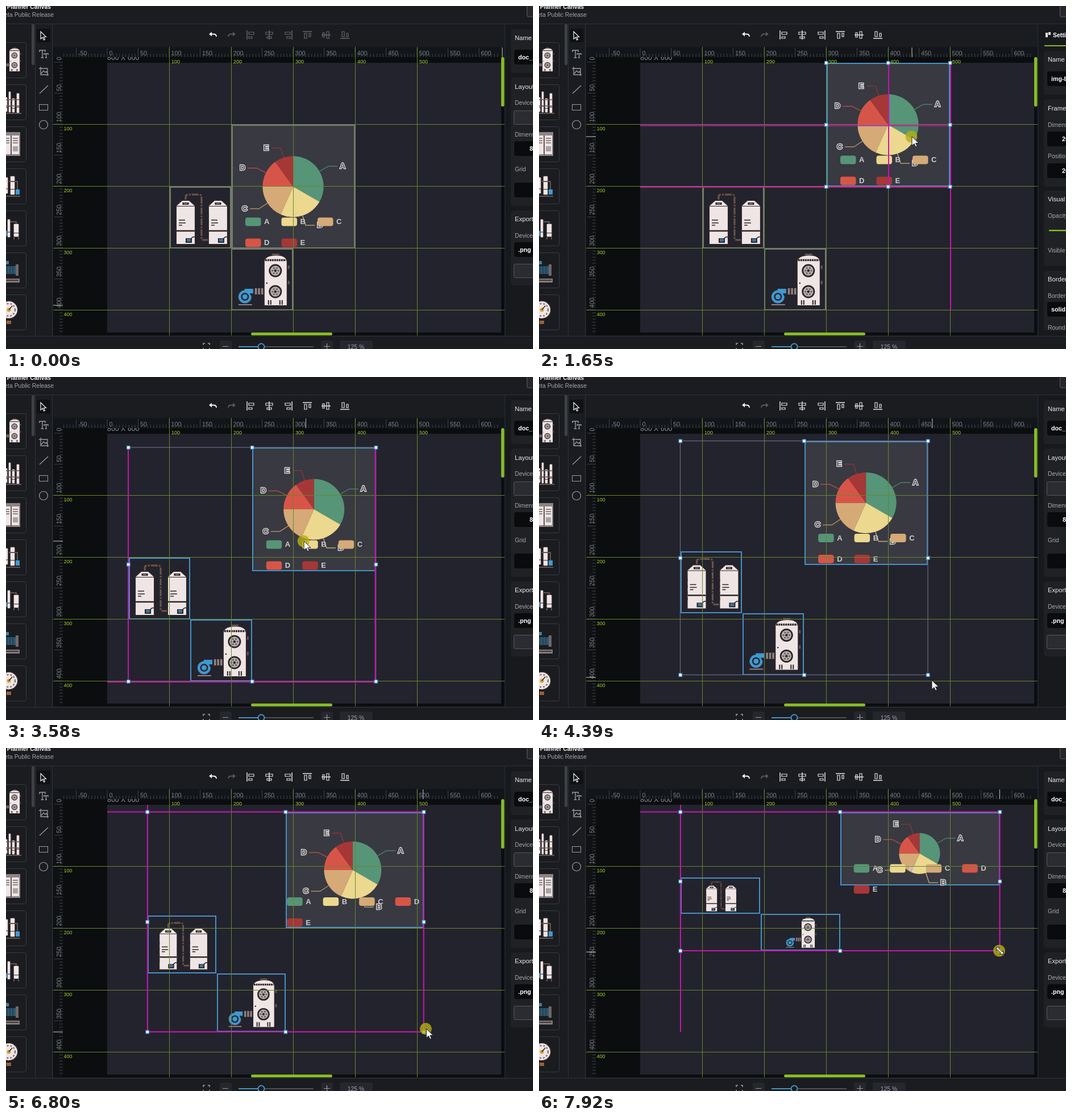
An HTML page for the animation above (7990 ms loop, 927 by 604 pixels).

```html
<!DOCTYPE html>
<html lang="en">
<head>
<meta charset="utf-8">
<title>Canvas editor</title>
<style>
html, body { margin: 0; width: 100%; height: 100%; overflow: hidden; background: #17191d; }
svg { display: block; width: 927px; height: 604px; font-family: "Liberation Sans", Arial, sans-serif; }
</style>
</head>
<body>
<svg id="stage" viewBox="0 0 927 604"></svg>
<script>
const LOOP = 7990;
const BLUE = '#4592c6', LIME = '#86bc22', PINK = '#c913b0', CREAM = '#efe5e4', DARK = '#2c2327', BROWN = '#65564f';
const UNIT = 1.09, X0 = 178, Y0 = 99;

// Markup helpers
const rect = (x, y, w, h, fill, more = '') => `<rect x="${x}" y="${y}" width="${w}" height="${h}" fill="${fill}" ${more}/>`;
const line = (x1, y1, x2, y2, color, width = 1) => `<path d="M${x1} ${y1}L${x2} ${y2}" stroke="${color}" stroke-width="${width}"/>`;
const path = (d, color, width = 1.5, fill = 'none', more = '') => `<path d="${d}" stroke="${color}" stroke-width="${width}" fill="${fill}" ${more}/>`;
const shape = (d, fill) => `<path d="${d}" fill="${fill}"/>`;
const circle = (x, y, r, fill, more = '') => `<circle cx="${x}" cy="${y}" r="${r}" fill="${fill}" ${more}/>`;
const text = (x, y, s, size, fill, more = '') => `<text x="${x}" y="${y}" font-size="${size}" fill="${fill}" ${more}>${s}</text>`;
const group = (transform, body) => `<g transform="${transform}">${body}</g>`;
const range = (n, f) => Array.from({ length: n }, (_, i) => f(i)).join('');

// Icons drawn on a 109 x 109 square
function fan(x, y) {
  return circle(x, y, 11.5, DARK) + circle(x, y, 8.8, '#b5aeae') +
    range(6, i => {
      const a = i * Math.PI / 3;
      return circle(x + 5.2 * Math.cos(a), y + 5.2 * Math.sin(a), 1.6, '#625b5d');
    }) + circle(x, y, 2.2, DARK);
}
const boiler = path('M59 22Q61 13 78.5 12.500T98 22V100H59Z', DARK, 4, CREAM) +
  shape('M59 22Q61 13 78.5 12.500T98 22V100H59Z', CREAM) +
  rect(72, 9, 13, 3, BROWN) + path('M60 20.500H97', DARK, 3.5, 'none', 'stroke-dasharray="3 1"') +
  fan(78, 39) + fan(78, 76) + rect(100, 30, 3, 6, BROWN) + rect(100, 57, 3, 6, BROWN) +
  circle(63, 61, 1.3, DARK) + path('M66 91V99M70 91V99M86 91V99M90 91V99', DARK, 2) +
  rect(41, 69, 17, 13, DARK) + range(3, i => rect(42 + i * 5.5, 70, 3.5, 11, '#8d8385')) +
  circle(24.5, 85, 14, DARK) + rect(24, 69, 16, 13, DARK) +
  shape('M24 71H39V79H33L36 85A11.500 11.500 0 1 1 24 73.500Z', '#3d9ad2') +
  circle(24.5, 85, 7, DARK) + circle(24.5, 85, 4.5, '#3d9ad2') +
  path('M13 99H37', '#8d8385', 2);

const body = 'M0 67V0L10 -9H22L32 0V67Z';
const vessel = group('translate(13 34)', path(body, DARK, 4, DARK) + shape(body, CREAM) +
  path('M0 .5H32', DARK, 1) + rect(10.5, -6, 11, 4, DARK) + rect(13, -5, 6, 2, '#777') + path('M0 44H32', DARK, 2.5) +
  path('M4 25H15M4 30H16M4 34H10', DARK, 1.6) + rect(16, 57, 11, 8, DARK) + rect(18, 58, 7, 5, '#3579a3') +
  range(4, i => rect(-4, 15 + i * 11, 4, 5, DARK)) + path('M25 59Q28 53 33 55', DARK, 1.5));
const pipeLine = 'M29 24V18Q29 14 34 14H52Q57 14 57 19V91Q57 94 61 94H70';
const pipe = path(pipeLine, DARK, 5.5) + path(pipeLine, BROWN, 3, 'none', 'stroke-dasharray="12 2 3 2"');
const tanks = pipe + vessel + group('translate(57 0)', vessel);

// Static interface
const dimText = (x, y, s) => text(x, y, s, 10.4, '#a6a8ac');
const lightText = (x, y, s) => text(x, y, s, 11.2, '#e8e8ea');
const card = (y, h) => rect(888, y, 60, h, '#1f2125', 'rx="5"');
const field = (y, s = '', x = 901) => rect(894, y, 50, 26, '#0a0b0d', 'rx="4"') + text(x, y + 17, s, 10.7, '#fff', 'font-weight="bold"');
const button = y => rect(893.5, y + .5, 50, 24, '#2a2c31', 'rx="2" stroke="#55575c"');

const docPanel = card(41, 77) + lightText(895, 60, 'Name') + field(77, 'doc_1') +
  card(126, 226) + lightText(895, 146, 'Layout') + dimText(895, 174, 'Device') + button(184) +
  dimText(895, 230, 'Dimensions') + field(238, '800', 921) + dimText(895, 291, 'Grid') + field(311) +
  card(360, 132) + lightText(895, 379, 'Export') + dimText(895, 408, 'Device') + field(416, '.png') + button(454);

const itemPanel = rect(891, 47, 4, 8, '#eee') + rect(896, 46, 4, 5, '#eee') + text(904, 55, 'Settings', 10.5, '#fff', 'font-weight="bold"') +
  rect(889, 69, 40, 2, LIME) +
  card(79, 77) + lightText(895, 98, 'Name') + field(115, 'img-box') +
  card(164, 154) + lightText(895, 184, 'Frame') + dimText(895, 213, 'Dimensions') + field(221, '200', 920) +
  dimText(895, 268, 'Position') + field(277, '200', 920) +
  card(325, 133) + lightText(895, 344, 'Visual') + dimText(895, 373, 'Opacity') + rect(897, 394, 40, 2.5, LIME) + dimText(895, 434, 'Visible') +
  card(466, 106) + lightText(895, 485, 'Border') + dimText(895, 514, 'Border') + field(521, 'solid') + dimText(895, 570, 'Round');

const silo = (x, y, w, h) => rect(x, y, w, h, CREAM, `rx="2" stroke="${DARK}" stroke-width="1.5"`) + line(x, y + h * .7, x + w, y + h * .7, DARK);
const thumbs = [
  group('translate(-21 69) scale(.46)', boiler),
  silo(-3, 160, 6, 27) + silo(4, 150, 5, 38) + silo(10, 162, 6, 26) + silo(18, 153, 6, 36) + path('M0 165H24M0 176H24', BROWN, 1.5) + rect(0, 188, 27, 2, BROWN),
  rect(-8, 222, 33, 42, '#8d8385') + rect(-6, 228, 29, 33, CREAM) + path('M9 228V262', DARK, 1.5) + path('M-2 233H6M12 233H21M-2 237H6M12 237H21M-2 241H6M12 241H21', DARK, 1.2) + rect(12, 247, 9, 9, '#aaa4a4'),
  silo(-4, 301, 8, 30) + silo(7, 299, 9, 34) + path('M5 309H20V330', BROWN, 2) + rect(17, 323, 7, 9, '#3d9ad2') + rect(-3, 334, 28, 2, BROWN),
  silo(2, 375, 6, 33) + silo(13, 383, 10, 24) + path('M8 380H18V383M14 407V411M22 407V411', BROWN, 2) + rect(-3, 396, 5, 9, '#3d9ad2'),
  rect(-4, 458, 21, 14, '#2d566f') + path('M2 458V472M7 458V472M12 458V472', '#22404f') + rect(17, 455, 5, 20, '#716769') + rect(-4, 449, 9, 6, '#40809f') + rect(-4, 480, 28, 7, '#857a7b') + path('M-2 483H22', DARK),
  circle(5, 535, 16, CREAM, `stroke="${DARK}" stroke-width="2"`) + circle(5, 535, 11, 'none', 'stroke="#83797a" stroke-width="2.500" stroke-dasharray="3 3"') + circle(5, 535, 3.5, '#d9a23c') + path('M5 535L11 528', DARK, 1.5) + rect(1, 554, 8, 6, '#96603a')
];

const GRAY = '#9a9ca1';
const tools = rect(54, 40, 24, 24, '#101114', 'rx="3"') +
  path('M61 45V58L64.3 55.2L66.5 60L68.5 59L66.3 54.5H70.5Z', '#f0f0f0', 1.2) +
  path('M59 81V78H69V81M64 78V91M61.500 91H66.500M67 86V84H74V86M70.500 84V91M69 91H72', GRAY, 1.4) +
  path('M58 110H73V123M61 107V121H75M62 119L66 114L69 117L71 115L73 119', GRAY, 1.3) + path('M59 154L74 140', GRAY, 1.3) +
  rect(58.5, 173.5, 15, 10, 'none', `stroke="${GRAY}"`) + circle(66, 209, 7.5, 'none', `stroke="${GRAY}" stroke-width="1.2"`);

const alignLeft = path('M-6 -8V8', 'currentColor') + path('M-3 -5H6V-1H-3ZM-3 3H3V6H-3Z', 'currentColor', 1.2);
const alignMid = path('M0 -8V8', 'currentColor') + path('M-6 -5H6V-1H-6ZM-4 3H4V6H-4Z', 'currentColor', 1.2);
const aligns = [[430, alignLeft, ''], [463, alignMid, ''], [497, alignLeft, 'scale(-1 1)'],
  [530, alignLeft, 'matrix(0 1 1 0 0 0)'], [563, alignMid, 'rotate(90)'], [596, alignLeft, 'matrix(0 -1 1 0 0 0)']]
  .map(([x, icon, tf]) => group(`translate(${x} 51) ${tf}`, icon)).join('');
const arrowBack = color => path('M-4 -1.500H1Q6 -1.500 6 3', color, 1.8) + shape('M-7 -1.500L-2 -5.500V2.500Z', color);

function rulers() {
  let out = rect(83, 72, 794, 18, '#121519') + rect(83, 90, 17, 490, '#0f1114');
  for (let u = -70; u <= 630; u += 5) {
    const x = X0 + u * UNIT, y = Y0 + u * UNIT, major = u % 50 === 0;
    if (x > 101 && x < 872) {
      out += line(x, major ? 74 : 84, x, 90, '#4b4e53', .8);
      if (major) out += text(x + 3.5, 86.5, u, 10.8, '#7b7e84');
    }
    if (y > 91 && y < 578) {
      out += line(major ? 85 : 94, y, 100, y, '#4b4e53', .8);
      if (major) out += group(`translate(97 ${y - 3.5}) rotate(-90)`, text(0, 0, u, 10.8, '#7b7e84'));
    }
  }
  return out;
}

const guides = range(5, i => line(287.5 + i * 109, 72, 287.5 + i * 109, 580, '#66872b') + text(291 + i * 109, 101, (i + 1) * 100, 9, '#a2d32e')) +
  range(4, i => line(83, 208.5 + i * 109, 877, 208.5 + i * 109, '#66872b') + text(101.5, 219 + i * 109, (i + 1) * 100, 9, '#a2d32e'));

document.getElementById('stage').innerHTML = `
<defs><clipPath id="view"><rect x="83" y="90" width="794" height="490"/></clipPath></defs>
${rect(0, 0, 927, 604, '#1a1c20')}${rect(0, 31, 927, 1, '#2c323b')}
${text(79, 5, 'n Planner Canvas', 10.3, '#f5f5f5', 'font-weight="bold" text-anchor="end"')}
${text(84, 19, 'eta Public Release', 10.4, '#a3a5aa', 'text-anchor="end"')}
${rect(916.5, -10, 30, 29, '#25272b', 'stroke="#5a5c61" rx="2"')}
${thumbs.map((t, i) => rect(-20.5, 64.5 + i * 74, 56, 62, '#1a1c20', 'rx="3" stroke="#393b40"') + t).join('')}
${rect(45, 32, 5, 72, '#3e4144', 'rx="2"')}${rect(51, 32, 1, 550, '#2c323b')}${rect(81, 32, 1, 550, '#2c323b')}${tools}
${group('translate(364 51)', arrowBack('#f4f4f4'))}${group('translate(397 51) scale(-1 1)', arrowBack('#55585d'))}
<g id="aligns">${aligns}</g>
${rect(83, 72, 794, 508, '#0b0d0f')}${rect(178, 100, 693, 475, '#23232d')}
<g clip-path="url(#view)">${text(178, 94.5, '800 X 600', 12.4, '#8b8d92')}</g>
${rulers()}
<g id="items" clip-path="url(#view)"></g>
${guides}
${rect(871, 90, 5.5, 87, LIME, 'rx="2.5"')}${rect(431, 575, 143, 5, LIME, 'rx="2.5"')}
${rect(877, 32, 1.5, 550, '#222d3b')}${rect(878.5, 32, 49, 549, '#17191d')}
<g id="docPanel">${docPanel}</g><g id="itemPanel">${itemPanel}</g>
${rect(0, 581, 927, 23, '#1a1c20')}${rect(0, 581, 927, 1, '#2c323b')}
${path('M347 597V594H350M355 594H358V597M358 602V605M347 602V605', GRAY)}
${rect(376, 589, 21, 20, '#25272c', 'rx="3"')}${rect(554, 589, 21, 20, '#25272c', 'rx="3"')}
${path('M381 599.5H391M559 599.5H570M564.5 594V605', GRAY, 1.2)}
${line(409, 600, 541, 600, '#606368', 1.5)}${line(409, 600, 449, 600, BLUE, 2)}${circle(449, 600, 5.5, '#1a1c20', `stroke="${BLUE}" stroke-width="2"`)}
${rect(587, 589, 58, 20, '#25262e', 'rx="3"')}${text(615.5, 603.5, '125 %', 10.4, '#a3a5aa', 'text-anchor="middle"')}
<g id="overlay"></g>`;

// Motion: [time, x, y] points
function at(keys, t) {
  if (t <= keys[0][0]) return keys[0].slice(1);
  for (let i = 1; i < keys.length; i++) {
    const [ta, ...a] = keys[i - 1], [tb, ...b] = keys[i];
    if (t <= tb) return a.map((v, k) => v + (b[k] - v) * (t - ta) / (tb - ta));
  }
  return keys[keys.length - 1].slice(1);
}
const chartMove = [[890, 396, 209], [1580, 505, 100], [1850, 505, 100], [1990, 505, 124]];
const groupMove = [[2960, 287, 124], [3580, 215, 124], [3720, 228, 119], [3850, 248.5, 112.5]];
const cornerMove = [[5470, 684, 525], [5880, 543, 389], [6040, 478, 335], [6240, 505, 380], [6480, 665, 500],
  [6800, 734.5, 500], [7080, 787, 440], [7660, 800, 500], [7920, 810.5, 357]];
const pointerMove = [[70, 940, 527], [480, 690, 425], [800, 547, 339], [890, 547, 339], [1580, 656, 230], [1850, 656, 230],
  [1990, 656, 254], [2130, 656, 254], [2350, 250, 112], [2700, 742, 548], [2960, 597, 289], [3580, 524, 289],
  [3720, 537, 284], [3850, 558, 278], [4320, 693, 522], [4390, 691, 534], [4530, 690, 550], [4600, 690, 550], [4740, 684, 525]];
const PICK = 800, DROP = 2350, GATHER = 2700;
const within = (t, a, b) => t >= a && t < b;
const pointer = t => t < 5470 ? at(pointerMove, t) : at(cornerMove, t + 25);

function groupBox(t) {
  const [x, y] = at(groupMove, t);
  if (t < 5470) return { x, y, w: 435.5, h: 412 };
  const [r, b] = at(cornerMove, t);
  return { x, y, w: r - x, h: b - y };
}
function chartBox(t) {
  if (t < 2960) {
    const [x, y] = at(chartMove, t);
    return { x, y, w: 218, h: 218 };
  }
  const g = groupBox(t);
  return { x: g.x + g.w / 2, y: g.y, w: g.w / 2, h: g.h * 218 / 412 };
}

// Chart
const slices = [['A', 0, 120, '#569577'], ['B', 120, 204, '#ecd88f'], ['C', 204, 270, '#d5aa77'], ['D', 270, 324, '#d75548'], ['E', 324, 360, '#a63737']];
const polar = (cx, cy, r, deg) => [cx + r * Math.sin(deg * Math.PI / 180), cy - r * Math.cos(deg * Math.PI / 180)];

function chart(box, w, h) {
  const cx = w / 2, cy = h / 2, r = Math.min(w, h) * .246;
  const cols = Math.max(1, Math.min(5, Math.floor((w - 41) / 63.5) + 1));
  const rows = Math.ceil(5 / cols), left = (w - 41 - (cols - 1) * 63.5) / 2;
  let pie = '', labels = '', legend = '';
  slices.forEach(([name, a, b, color], i) => {
    const mid = (a + b) / 2, side = mid < 180 ? 1 : -1;
    const edge = polar(cx, cy, r, mid), elbow = polar(cx, cy, r + 18, mid), lx = elbow[0] + side * 25;
    pie += shape(`M${cx} ${cy}L${polar(cx, cy, r, a)}A${r} ${r} 0 0 1 ${polar(cx, cy, r, b)}Z`, color);
    labels += path(`M${edge}L${elbow}h${side * 16}`, color, 1.4, 'none', 'opacity=".75"');
    if (lx > 8 && lx < w - 5) labels += text(lx, elbow[1] + 4, name, 13.5, '#55555b', 'font-weight="bold" text-anchor="middle" stroke="#e0e0e2" stroke-width="2.4" paint-order="stroke"');
    const x = left + i % cols * 63.5, y = h - 10 - (rows - 1 - Math.floor(i / cols)) * 37;
    legend += rect(x, y - 7.5, 27.5, 15, color, 'rx="4"') + text(x + 33, y + 4, name, 13, '#cdcdd0', 'font-weight="bold"');
  });
  return group(`translate(${box.x} ${box.y})`, pie + labels + legend);
}

// Outlines stay on whole pixels
function frame(b, color, fill = 'none') {
  const x = Math.floor(b.x) + 2, y = Math.round(b.y) + 1;
  return rect(x, y, Math.round(b.x + b.w) - 1 - x, Math.round(b.y + b.h) - 1 - y, fill, `stroke="${color}" stroke-width="2"`);
}
function icon(b, art) {
  const s = Math.min(b.w, b.h) / 109;
  return group(`translate(${b.x + (b.w - 109 * s) / 2} ${b.y + (b.h - 109 * s) / 2}) scale(${s})`, art);
}
function handles(b) {
  let out = '';
  for (let i = 0; i < 9; i++) {
    if (i === 4) continue;
    const x = b.x + b.w * (i % 3) / 2, y = b.y + b.h * Math.floor(i / 3) / 2;
    out += rect(x - 2.5, y - 2.5, 5.5, 5.5, '#fff', `stroke="${BLUE}" stroke-width="1.3"`);
  }
  return out;
}

function snapLines(t, g) {
  const r = g.x + g.w, b = g.y + g.h, pink = (...p) => line(...p, PINK, 2);
  if (within(t, 1540, 1850)) return pink(X0, 210.5, 723, 210.5) + pink(X0, 319, 723, 319) + pink(615, 100, 615, 318) + pink(724, 100, 724, 535);
  if (within(t, 3450, 3650)) return pink(g.x, g.y, g.x, b) + pink(r - 1, g.y, r - 1, b) + pink(X0, b + 1, r, b + 1);
  if (t < 5540) return '';
  const low = Math.max(b, t < 6200 ? 453 : 500);
  return pink(g.x + .5, 100, g.x + .5, low) + pink(r, g.y, r, b) + pink(g.x, b, r, b) + (t > 6300 ? pink(X0, g.y, r, g.y) : '');
}

function cursor(t, [x, y]) {
  const pressed = within(t, PICK, 1990) || within(t, DROP, GATHER) || within(t, 2930, 3850) || t >= 5140;
  const sizing = within(t, 4740, 5470) || t >= 7900;
  const outline = sizing ? 'M-6 -6H0L-2 -4L4 2L6 0V6H0L2 4L-4 -2L-6 0Z' : 'M0 0V16L4 12.500L6.500 18L9 17L6.500 11.500H12Z';
  return (pressed ? circle(x - 1, y, 10.5, '#b5ae14', 'opacity=".8"') : '') +
    group(`translate(${x} ${y})`, path(outline, '#222', 1, '#fff'));
}

const el = id => document.getElementById(id);
function draw(t) {
  const g = groupBox(t), c = chartBox(t), late = chartBox(t - 60);
  const one = within(t, PICK, DROP), all = t >= GATHER;
  const tankBox = { x: g.x, y: g.y + g.h * 194 / 412, w: g.w / 4, h: g.h * 109 / 412 };
  const boilerBox = { ...tankBox, x: g.x + g.w / 4, y: g.y + g.h * 303 / 412 };
  const edge = all ? BLUE : '#77777d';

  el('items').innerHTML = frame(tankBox, edge) + icon(tankBox, tanks) + frame(boilerBox, edge) + icon(boilerBox, boiler) +
    frame(c, one ? BLUE : edge, '#393941') + chart(c, late.w, late.h);

  const p = pointer(t), [mx, my] = pointer(t - 30), sel = all ? g : c;
  let over = line(Math.min(mx, 873), 73, Math.min(mx, 873), 90, '#c9cacc') + line(83, my, 100, my, '#c9cacc');
  if (all) over += rect(g.x, g.y, g.w, g.h, 'none', 'stroke="#69667a" stroke-width="1.3"');
  over += snapLines(t, g);
  if (one || all) over += handles(sel);
  if (within(t, DROP, GATHER)) over += rect(250, 112, p[0] - 250, p[1] - 112, BLUE, `fill-opacity=".08" stroke="${BLUE}"`);
  el('overlay').innerHTML = over + cursor(t, p);

  el('aligns').setAttribute('color', one || all ? '#e4e4e6' : '#64676c');
  el('docPanel').setAttribute('display', one ? 'none' : 'inline');
  el('itemPanel').setAttribute('display', one ? 'inline' : 'none');
}

const start = performance.now();
function tick() {
  draw((performance.now() - start) % LOOP);
  requestAnimationFrame(tick);
}
tick();
</script>
</body>
</html>
```
